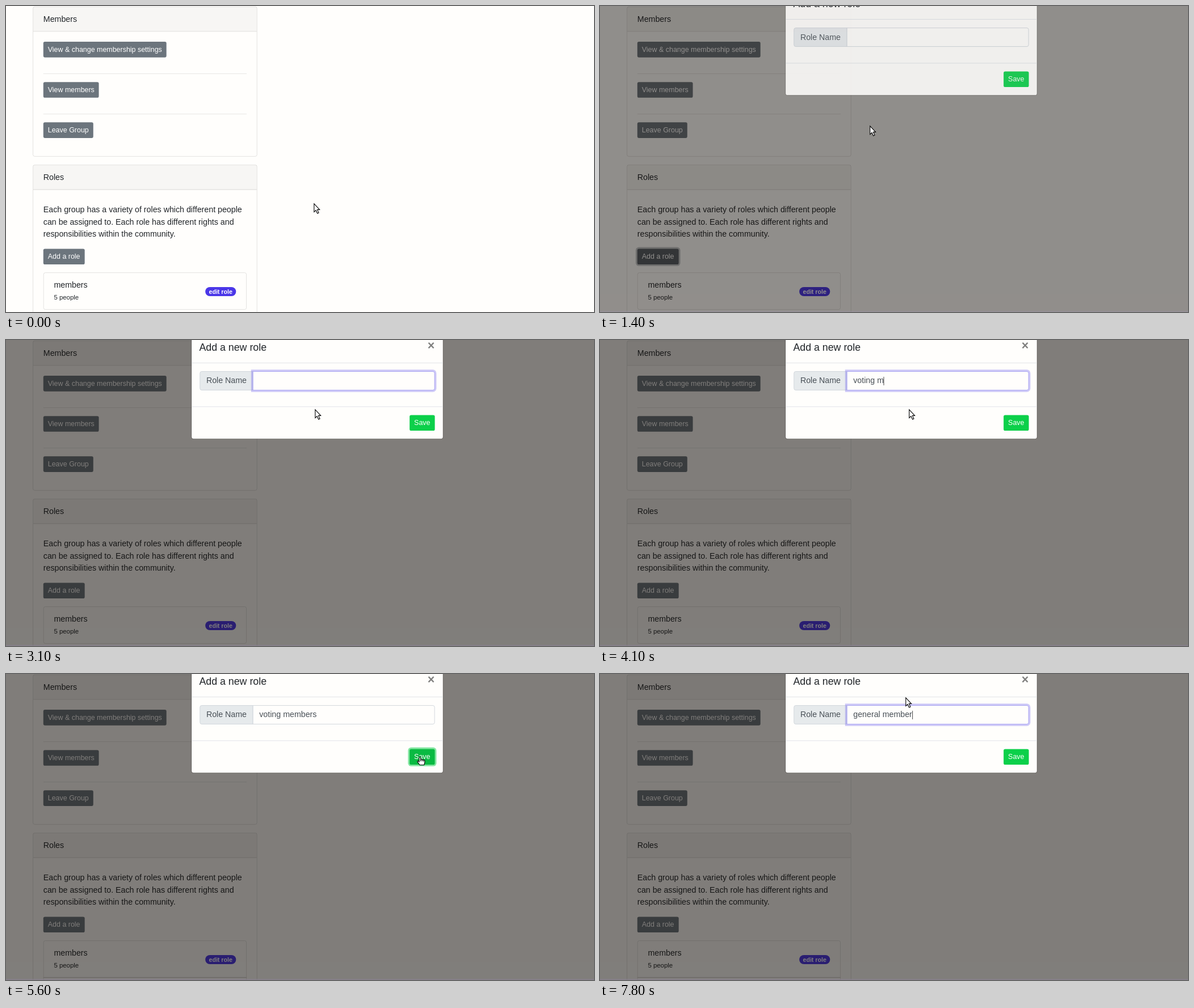
Animation of 1036x540 px, one loop 8000 ms. Source, as an HTML page:

```html
<!DOCTYPE html>
<html lang="en">
<head>
<meta charset="utf-8">
<title>Add a role</title>
<style>
html, body { margin: 0; width: 100%; height: 100%; overflow: hidden; }
body {
  position: relative; background: #fffefc; color: #212529;
  font: 16px/24px "Liberation Sans", Arial, sans-serif;
}
body *, .card::before { position: absolute; box-sizing: border-box; }
p, h5 { margin: 0; font-weight: 400; white-space: nowrap; }
svg { left: 0; top: 0; overflow: visible; }

/* the interface is laid out at full size and shown at 8/9 */
.zoom { left: 0; top: 0; width: 1166px; height: 608px; transform: scale(.88889); transform-origin: 0 0; }

.card { left: 53px; width: 445px; border: 1px solid rgba(0,0,0,.125); border-radius: 4px; }
.card::before {
  content: ""; left: 0; right: 0; top: 0; height: 49px;
  background: rgba(0,0,0,.03); border-bottom: 1px solid rgba(0,0,0,.125);
}
.rule { left: 74px; width: 403px; height: 1px; background: rgba(0,0,0,.1); }
.btn {
  left: 74px; height: 31px; padding: 0 9px; border-radius: 3.2px;
  background: #6c757d; color: #fff; font-size: 14px; line-height: 31px; white-space: nowrap;
}
.item { left: 74px; width: 403px; height: 74px; border: 1px solid rgba(0,0,0,.125); }
.badge {
  right: 710px; top: 557.5px; height: 18px; padding: 0 7.2px; border-radius: 9px;
  background: #4b37e8; color: #fff; font-size: 12px; font-weight: 700; line-height: 18px;
  white-space: nowrap;
}
#shade { inset: 0; background: rgba(12,8,4,.52); }
#shade::after {
  content: ""; position: absolute; left: 0; right: 0; bottom: 0; height: 2px;
  background: rgba(140,130,150,.5);
}
#modal { left: 0; top: 0; width: 1166px; height: 200px; }
.sheet {
  left: 367px; top: -30px; width: 500px; height: 227px; border-radius: 4.8px;
  background: #fffefc; background-clip: padding-box; border: 1px solid rgba(0,0,0,.2);
}
.line { left: 368px; width: 498px; height: 1px; background: #dee2e6; }
.label {
  left: 384px; top: 62px; width: 106px; height: 38px; padding-left: 12px; line-height: 36px;
  background: #e6eaec; border: 1px solid #ced4da; border-radius: 4px 0 0 4px; color: #495057;
}
#field {
  left: 489px; top: 62px; width: 361px; height: 38px; padding-left: 12px; line-height: 36px;
  background: #fffefc; border: 1px solid #ced4da; border-radius: 0 4px 4px 0;
  color: #495057; white-space: pre;
}
#field span { position: static; }
#caret {
  position: static; display: inline-block; width: 1px; height: 17px;
  vertical-align: -3.5px; background: #333;
}
#save { left: 800px; top: 149px; background: #0cd04a; }

#shade, #modal, #add, #field, #text, #caret, #save, #more, #first, #mouse, #mouse svg {
  animation: 8s step-end -5ms infinite;
}
#shade { animation-name: dim; }
#modal { animation-name: drop; }
#add { animation-name: press; }
#field { animation-name: focus; }
#text { animation-name: select; }
#caret { animation-name: caret; }
#save { animation-name: save; }
#more { animation-name: more; }
#first { animation-name: square; }
#mouse { animation-name: move; left: 0; top: 0; }
#mouse #arrow { animation-name: arrow; }
#mouse #hand { animation-name: hand; }
#mouse #beam { animation-name: beam; }

@keyframes dim { 0% { opacity: 0 } 17.5% { opacity: .87 } 18.75% { opacity: .98 } 20%, 100% { opacity: 1 } }
@keyframes drop {
  0% { opacity: 0; top: -56px }
  17.5% { opacity: .87; top: -19px }
  18.75% { opacity: 1; top: -3px }
  20%, 100% { opacity: 1; top: 0 }
}
@keyframes press {
  0% { background: #6c757d; box-shadow: none }
  13.75% { background: #5a6268; box-shadow: none }
  17.5% { background: #545b62; box-shadow: 0 0 0 3.2px rgba(130,138,145,.5) }
  20%, 100% { background: #6c757d; box-shadow: none }
}
@keyframes focus {
  0% { border-color: #ced4da; box-shadow: none }
  28.75% { border-color: #b5b5ea; box-shadow: 0 0 0 1.6px rgba(75,55,232,.14) }
  31.25% { border-color: #a19cf2; box-shadow: 0 0 0 3.2px rgba(75,55,232,.27) }
  67.5% { border-color: #b5b5ea; box-shadow: 0 0 0 1.6px rgba(75,55,232,.14) }
  68.75% { border-color: #ced4da; box-shadow: none }
  78.75% { border-color: #a9b3ee; box-shadow: 0 0 0 1px rgba(75,55,232,.15) }
  80%, 100% { border-color: #a19cf2; box-shadow: 0 0 0 3.2px rgba(75,55,232,.27) }
}
@keyframes select {
  0%, 82.5%, 100% { background: none; color: #495057 }
  78.75% { background: #cd5c5c; color: #fff }
}
@keyframes caret {
  0%, 37.5%, 67.5% { visibility: hidden }
  31.25%, 42.5%, 82.5%, 100% { visibility: visible }
}
@keyframes save {
  0% { background: #0cd04a; box-shadow: none }
  65% { background: #0aba42; box-shadow: none }
  67.5% { background: #0aba42; box-shadow: 0 0 0 1.6px rgba(12,208,74,.3) }
  68.75% { background: #0aba42; box-shadow: 0 0 0 3.2px rgba(12,208,74,.5) }
  78.75% { background: #0aba42; box-shadow: 0 0 0 1px rgba(12,208,74,.15) }
  80%, 100% { background: #0cd04a; box-shadow: none }
}
@keyframes more { 0% { visibility: hidden } 70%, 100% { visibility: visible } }
@keyframes square { 0% { border-radius: 4px } 70%, 100% { border-radius: 4px 4px 0 0 } }
@keyframes move {
  0% { transform: translate(542px, 348px) }
  6.25% { transform: translate(542px, 348px); animation-timing-function: steps(2) }
  8.75% { transform: translate(430px, 376px); animation-timing-function: steps(3) }
  12.5% { transform: translate(142px, 430px) }
  13.75% { transform: translate(120px, 433px) }
  17.5% { transform: translate(475px, 211px) }
  21.25% { transform: translate(475px, 211px); animation-timing-function: steps(6) }
  28.75% { transform: translate(555px, 74px) }
  33.75% { transform: translate(555px, 74px); animation-timing-function: steps(4) }
  38.75% { transform: translate(544px, 122px) }
  62.5% { transform: translate(636px, 128px) }
  63.75% { transform: translate(690px, 139px) }
  65% { transform: translate(729px, 146px) }
  71.25% { transform: translate(729px, 146px); animation-timing-function: steps(5) }
  77.5% { transform: translate(553px, 66px) }
  78.75% { transform: translate(549px, 56px) }
  80%, 100% { transform: translate(538px, 41px) }
}
@keyframes arrow {
  0%, 17.5%, 36.25%, 72.5%, 80%, 100% { visibility: visible }
  13.75%, 28.75%, 65%, 76.25% { visibility: hidden }
}
@keyframes hand {
  0%, 17.5%, 72.5%, 100% { visibility: hidden }
  13.75%, 65% { visibility: visible }
}
@keyframes beam {
  0%, 36.25%, 80%, 100% { visibility: hidden }
  28.75%, 76.25% { visibility: visible }
}
</style>
</head>
<body>
<div class="zoom">
  <div class="card" style="top:.5px;height:298px"></div>
  <p style="left:74px;top:13.5px">Members</p>
  <div class="btn" style="top:70.5px">View &amp; change membership settings</div>
  <div class="rule" style="top:134px"></div>
  <div class="btn" style="top:150.5px">View members</div>
  <div class="rule" style="top:214px"></div>
  <div class="btn" style="top:230.5px">Leave Group</div>

  <div class="card" style="top:315px;height:320px"></div>
  <p style="left:74px;top:328px">Roles</p>
  <p style="left:74px;top:393px">Each group has a variety of roles which different people<br>can be assigned to. Each role has different rights and<br>responsibilities within the community.</p>
  <div class="btn" id="add" style="top:481.5px">Add a role</div>
  <div class="item" id="first" style="top:528.5px"></div>
  <div class="item" id="more" style="top:601.5px"></div>
  <p style="left:95px;top:541.5px">members</p>
  <p style="left:95px;top:568.5px;font-size:12.8px;line-height:19.2px">5 people</p>
  <div class="badge">edit role</div>
</div>

<div id="shade"></div>
<div class="zoom">
  <div id="modal">
    <div class="sheet"></div>
    <h5 style="left:383px;top:-1px;font-size:20px;line-height:30px">Add a new role</h5>
    <p style="left:835.5px;top:-1px;font-size:24px;font-weight:700;color:#7f7f7e">×</p>
    <div class="line" style="top:45px"></div>
    <div class="label">Role Name</div>
    <div id="field"><span id="text"></span><i id="caret"></i></div>
    <div class="line" style="top:132px"></div>
    <div class="btn" id="save">Save</div>
  </div>
</div>

<div id="mouse">
  <svg id="arrow" width="12" height="19" fill="#fff" stroke="#000" stroke-width="1.1">
    <path d="M.8.8V15.4L4 12.4 6.6 18 9 16.9 6.5 11.4H10.6Z"/>
  </svg>
  <svg id="hand" width="16" height="16" fill="#fff" stroke="#000" stroke-width="1.1">
    <path d="M-1 9V1.5Q-1 .3 .3 .3T1.6 1.5V5Q3 4 4.2 5.2 5.6 4.5 6.6 5.8 8.8 5.4 8.8 7.5V10.5L7.6 14.5H0L-3.8 9.4Q-4.4 7.6-2.8 7.4Z"/>
    <path d="M1.6 5V8M4.2 5.2V8M6.6 5.8V8.5" fill="none"/>
  </svg>
  <svg id="beam" width="8" height="16" fill="none">
    <path d="M-3.5-6.5H-1L0-5.8 1-6.5H3.5M0-6V6M-3.5 6.5H-1L0 5.8 1 6.5H3.5" stroke="#fff" stroke-width="3"/>
    <path d="M-3.5-6.5H-1L0-5.8 1-6.5H3.5M0-6V6M-3.5 6.5H-1L0 5.8 1 6.5H3.5" stroke="#000" stroke-width="1.5"/>
  </svg>
</div>

<script>
const loop = 8000;
const field = document.getElementById('text');

// Each chunk appears at its time; the whole word goes at `end`.
function type(chunks, end) {
  for (const [start, chunk] of chunks) {
    const span = document.createElement('span');
    span.textContent = chunk;
    field.append(span);
    const frames = [
      { offset: 0, fontSize: '0px' },
      { offset: start / loop, fontSize: '16px' },
      { offset: end / loop, fontSize: end < loop ? '0px' : '16px' }
    ];
    if (end < loop) frames.push({ offset: 1, fontSize: '0px' });
    span.animate(frames.map(f => ({ ...f, easing: 'step-end' })),
      { duration: loop, delay: -5, iterations: Infinity });
  }
}

type([
  [3400, 'v'], [3500, 'o'], [3600, 'ti'], [3800, 'n'], [3900, 'g '],
  [4100, 'm'], [4200, 'em'], [4400, 'b'], [4500, 'e'], [4700, 'rs']
], 6600);
type([
  ...[...'genera'].map((c, i) => [6600 + i * 100, c]),
  [7300, 'l '], [7400, 'm'], [7600, 'em'], [7700, 'be'], [7800, 'r']
], loop);
</script>
</body>
</html>
```
